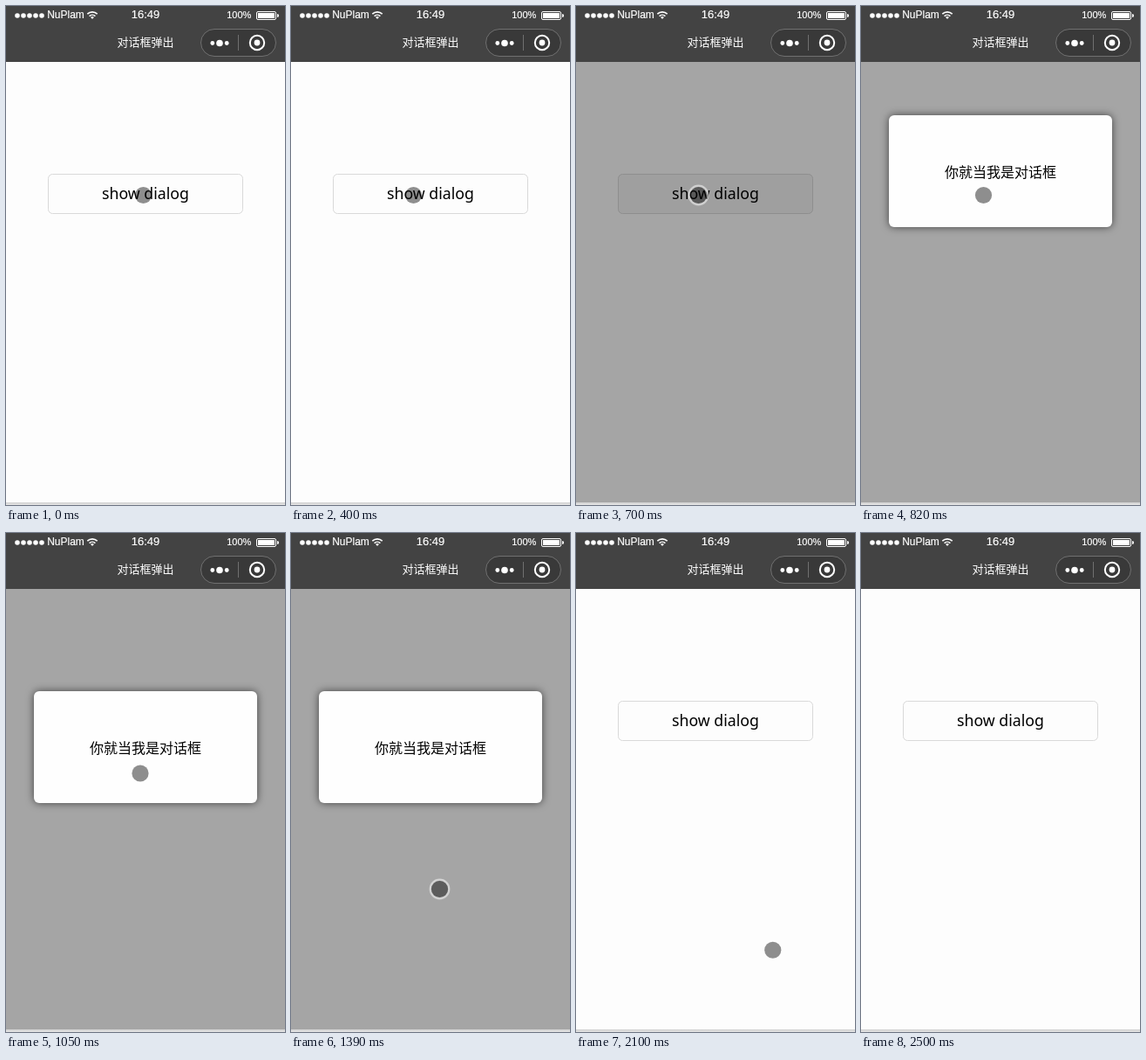
An HTML page for the animation above (3.03 s loop, 320 by 571 pixels).

```html
<!DOCTYPE html>
<html lang="zh-CN">
<head>
<meta charset="utf-8">
<title>对话框弹出</title>
<style>
  html, body { margin: 0; width: 100%; height: 100%; overflow: hidden; background: #fdfdfd; }
  svg { display: block; width: 100%; height: 100%; }
  text { text-anchor: middle; font-family: "Noto Sans CJK SC", "Noto Sans CJK", sans-serif; }
  .status { fill: #fff; stroke: #fff; stroke-width: .2; font-family: "Liberation Sans", sans-serif; }
  .line { fill: none; stroke: #fff; }
  #panel { fill: #fefefe; filter: drop-shadow(0 0 5px rgba(0, 0, 0, .6)); }
</style>
</head>
<body>
<svg viewBox="0 0 320 571">
  <defs>
    <linearGradient id="edge" x2="0" y2="1">
      <stop stop-color="#cfcfcf"/><stop offset="1" stop-color="#e6e6e6"/>
    </linearGradient>
  </defs>

  <rect width="320" height="571" fill="#fdfdfd"/>
  <rect id="button" x="48.5" y="192.5" width="223" height="45" rx="5" stroke="#d9d9d9"/>
  <text x="160" y="221" font-size="17.7" style="font-family: 'Noto Sans', sans-serif">show dialog</text>

  <rect id="mask" y="64" width="320" height="504"/>
  <g id="dialog">
    <rect id="panel" x="32" width="256" height="128" rx="6"/>
    <text x="160" y="70.5" font-size="16">你就当我是对话框</text>
  </g>
  <rect y="568" width="320" height="3" fill="url(#edge)"/>

  <g id="cursor">
    <circle id="ring" r="10.8" fill="none" stroke="#fff" stroke-opacity=".5" stroke-width="2.2"/>
    <circle r="9.6" fill="#000" fill-opacity=".44"/>
  </g>

  <rect width="320" height="64" fill="#434343"/>
  <g fill="#fff">
    <path d="M13 11h29" class="line" stroke-width="5.6" stroke-linecap="round" stroke-dasharray="0 7"/>
    <text class="status" x="68.5" y="14" font-size="12">NuPlam</text>
    <g class="line" stroke-width="1.6">
      <path d="M93.3 9.2a8.2 8.2 0 0 1 11.4 0M95.6 11.6a5 5 0 0 1 6.8 0"/>
    </g>
    <path d="M99 15l-2-2.2a3 3 0 0 1 4 0z"/>
    <text class="status" x="160" y="14.3" font-size="13">16:49</text>
    <text class="status" x="267.3" y="14" font-size="11">100%</text>
    <rect class="line" x="287.5" y="6.5" width="22" height="9" rx="1.5"/>
    <rect x="289" y="8" width="19" height="6"/>
    <path d="M311 9a2 2 0 0 1 0 4z"/>
    <text x="160" y="46.3" font-size="13" font-weight="500">对话框弹出</text>

    <rect x="223.5" y="26.5" width="86" height="31" rx="15.5" fill="#393939" stroke="#707070"/>
    <circle cx="236.8" cy="42.5" r="2.4"/>
    <circle cx="245" cy="42.5" r="3.8"/>
    <circle cx="253.2" cy="42.5" r="2.4"/>
    <path d="M266.5 33v18" stroke="#707070"/>
    <circle class="line" cx="288" cy="42" r="8.2" stroke-width="2"/>
    <circle cx="288" cy="42" r="3.4"/>
  </g>
</svg>
<script>
const LOOP = 3030, TICK = 58, CLOSE_AT = 1810;
const el = id => document.getElementById(id);
const [button, mask, dialog, cursor, ring] =
  ['button', 'mask', 'dialog', 'cursor', 'ring'].map(el);

const clamp = v => Math.max(0, Math.min(1, v));
const smooth = p => p * p * (3 - 2 * p);
const easeIn = p => p * p;
const easeOut = p => p * (2 - p);
const between = (k, from, to) => k >= from && k < to;
const show = (node, on) => node.setAttribute('visibility', on ? 'visible' : 'hidden');

// Pointer path: tick, x, y, easing towards this point
const path = [
  [0, 157.5, 216.5, smooth],
  [7, 140.5, 216.5, smooth],
  [14, 140.5, 216.5, smooth],
  [18, 154, 275, easeIn],
  [23, 170.5, 407.5, easeOut],
  [32, 170.5, 407.5, smooth],
  [40, 281, 547, smooth],
  [43, 284, 582, easeIn]
];

function pointerAt(k) {
  const i = Math.max(1, path.findIndex(point => point[0] >= k));
  const [t0, x0, y0] = path[i - 1], [t1, x1, y1, ease] = path[i];
  const p = ease((k - t0) / (t1 - t0));
  return [x0 + (x1 - x0) * p, y0 + (y1 - y0) * p];
}

// The screen refreshes in discrete ticks; closing happens at a fixed moment.
function tickAt(ms) {
  const k = Math.floor((ms + 6) / TICK);
  return ms < CLOSE_AT ? Math.min(k, 30) : Math.max(k, 31);
}

function draw(ms) {
  const k = tickAt(ms);
  button.setAttribute('fill', between(k, 10, 14) ? '#f4f4f4' : '#fdfdfd');
  mask.setAttribute('opacity', k < 31 ? 0.35 * clamp((k - 10) / 2) : 0);

  const drop = k < 31 ? 56 * smooth(clamp((k - 14) / 4)) : 0;
  dialog.setAttribute('transform', `translate(0 ${125 + drop})`);
  show(dialog, between(k, 14, 32));

  show(cursor, k < 43);
  show(ring, between(k, 10, 14) || between(k, 24, 31));
  if (k < 43) cursor.setAttribute('transform', `translate(${pointerAt(k)})`);
}

const start = performance.now();
function frame() {
  draw((performance.now() - start) % LOOP);
  requestAnimationFrame(frame);
}
frame();
</script>
</body>
</html>
```
